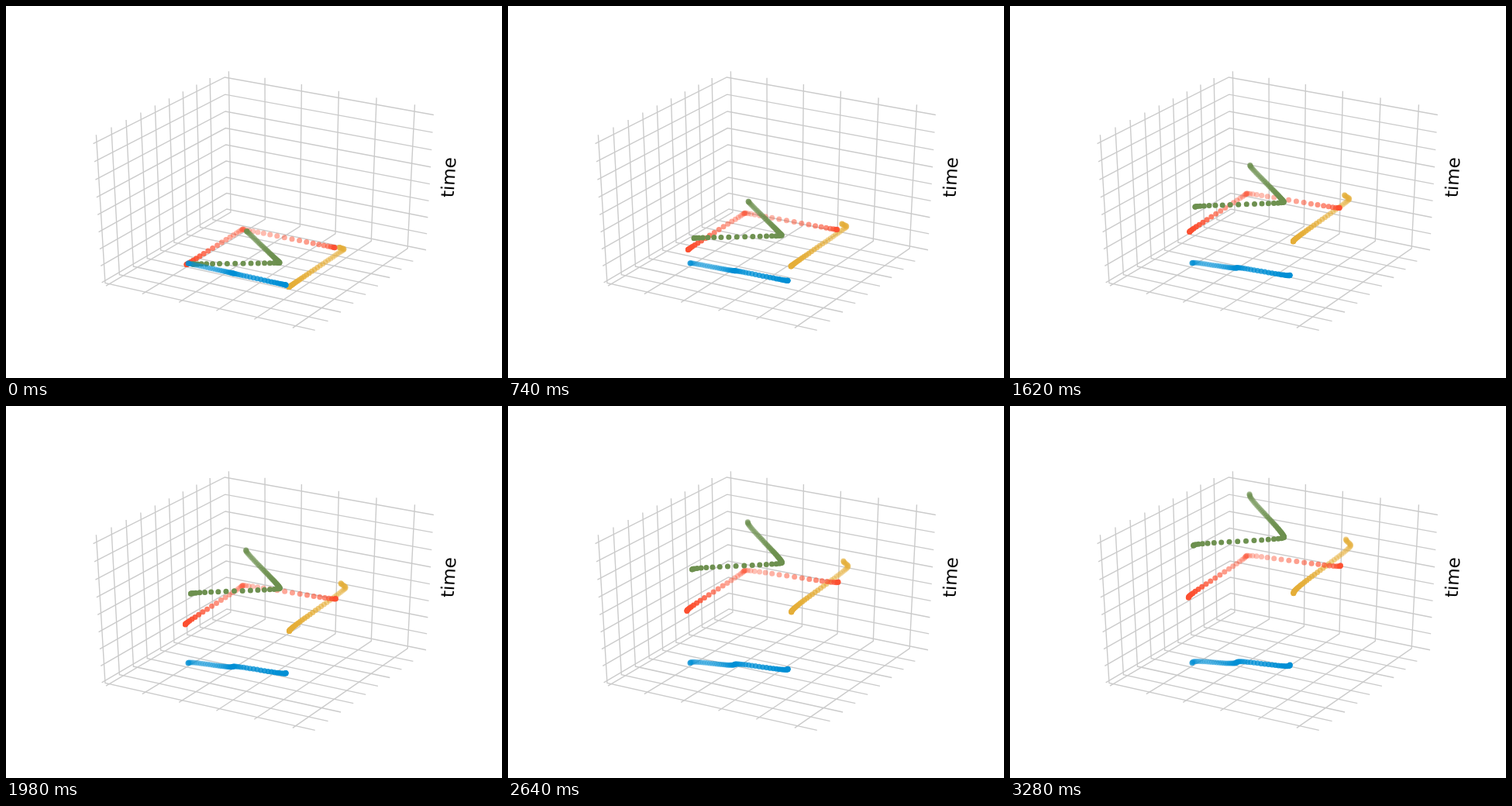
An HTML page with a canvas that plays this animation: 640x480 px, repeating every 3.7 s.

```html
<!DOCTYPE html>
<html lang="en">
<head>
<meta charset="utf-8">
<title>Trajectories rising along the time axis</title>
<style>
html, body { margin: 0; width: 100%; height: 100%; overflow: hidden; background: #fff; }
canvas { display: block; }
</style>
</head>
<body>
<canvas id="stage" width="640" height="480"></canvas>
<script>
const ctx = document.getElementById('stage').getContext('2d');
const LOOP = 3700, STEP = 20, LAST = 164;
const SAMPLES_PER_HEIGHT = 400;

// Homogeneous columns of the perspective: box corner, then the far end of each axis.
const corner = [285, 265, 1];
const axis = (x, y, w) => [x * w - corner[0], y * w - corner[1], w - 1];
const axes = [axis(541.8, 317.8, 0.963), axis(123.8, 360, 0.927), axis(282.2, 83.4, 0.952)];
const rise = axes[2];

function project(...p) {
  const [x, y, w] = corner.map((c, i) => c + p.reduce((sum, v, k) => sum + v * axes[k][i], 0));
  return [x / w, y / w];
}

// Each hand moves a -> b -> c on the floor; b is reached at `arrive`, left from `leave`.
// z0..z1 are the final heights of the first and last sample.
const series = [
  { color: '#e5ae38', z0: 0.642, z1: 0.759, a: [365, 362.5], b: [437, 313.5], c: [430, 311.5],
    arrive: 0.8, leave: 0.65 },
  { color: '#fc4f30', z0: 0.47, z1: 0.58, a: [233, 333.5], b: [305.5, 288], c: [424, 311.7],
    arrive: 0.52, leave: 0.48 },
  { color: '#6d904f', z0: 0.817, z1: 0.962, a: [241, 333], b: [353.5, 331.5], c: [310.5, 290.5],
    arrive: 0.35, leave: 0.26 },
  { color: '#008fd5', z0: 0, z1: 0.1415, a: [235, 332], b: [293, 344.9], c: [361, 360],
    arrive: 0.6, leave: 0.53 }
];

// Minimum-jerk reach from 0 to 1.
function reach(t) {
  t = Math.max(0, Math.min(1, t));
  return t ** 3 * (10 - 15 * t + 6 * t * t);
}

function sample({ a, b, c, z0, z1, arrive, leave }) {
  const count = Math.round((z1 - z0) * SAMPLES_PER_HEIGHT);
  return Array.from({ length: count + 1 }, (_, n) => {
    const t = n / count, first = reach(t / arrive), second = reach((t - leave) / (1 - leave));
    const [x, y] = [0, 1].map(k => a[k] + (b[k] - a[k]) * first + (c[k] - b[k]) * second);
    const w = 1 / (1 + 0.000828 * (y - corner[1]));
    return { x: x * w, y: y * w, w, z: z0 + (z1 - z0) * t };
  });
}
series.forEach(s => s.samples = sample(s));

function line(...points) {
  ctx.beginPath();
  points.forEach(p => ctx.lineTo(...project(...p)));
  ctx.stroke();
}

function drawGrid() {
  ctx.strokeStyle = '#cbcbcb';
  ctx.lineWidth = 1.4;
  for (let i = 0; i < 6; i++) {
    const x = 0.02 + 0.1782 * i;
    line([x, 1, 0], [x, 0, 0], [x, 0, 1]);
  }
  for (let i = 0; i < 9; i++) {
    const y = 0.12 + 0.107 * i, z = 0.0173 + 0.1172 * i;
    line([1, y, 0], [0, y, 0], [0, y, 1]);
    line([0, 1, z], [0, 0, z], [1, 0, z]);
  }
}

function drawLabel() {
  ctx.save();
  ctx.translate(570.2, 221);
  ctx.rotate(-86.7 * Math.PI / 180);
  ctx.font = '23px "DejaVu Sans", sans-serif';
  ctx.textAlign = 'center';
  ctx.fillStyle = '#000';
  ctx.fillText('time', 0, 8.8);
  ctx.restore();
}

function drawSeries({ color, samples }, progress) {
  const dots = samples.map(p => {
    const z = p.z * progress, w = p.w + z * rise[2];
    return { x: (p.x + z * rise[0]) / w, y: (p.y + z * rise[1]) / w, w };
  }).sort((p, q) => q.w - p.w);
  const far = dots[0].w, near = dots[dots.length - 1].w;
  ctx.fillStyle = color;
  for (const d of dots) {
    ctx.globalAlpha = 0.3 + 0.7 * (far - d.w) / (far - near);
    ctx.beginPath();
    ctx.arc(d.x, d.y, 3.5, 0, 2 * Math.PI);
    ctx.fill();
  }
  ctx.globalAlpha = 1;
}

function render() {
  const tick = Math.floor(performance.now() % LOOP / STEP);
  const progress = Math.min(tick, LAST) / LAST;
  ctx.fillStyle = '#fff';
  ctx.fillRect(0, 0, 640, 480);
  drawGrid();
  drawLabel();
  series.forEach(s => drawSeries(s, progress));
  requestAnimationFrame(render);
}
render();
</script>
</body>
</html>
```
